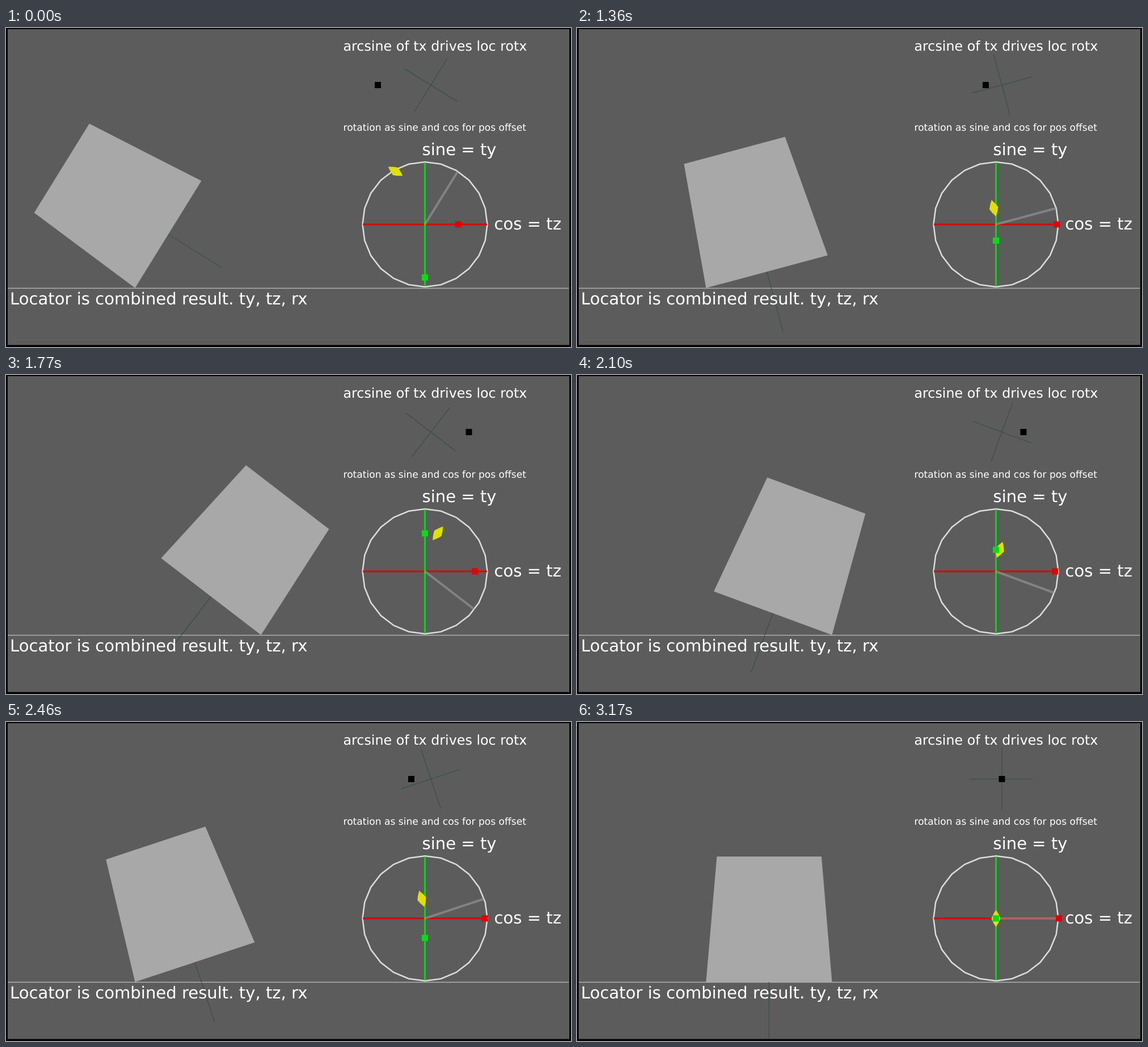
Write an HTML page that moves like this. It is 996 px wide and 562 px high and loops after 3860 ms.

```html
<!DOCTYPE html>
<html lang="en">
<head>
<meta charset="utf-8">
<title>Rolling box rig</title>
<style>
  html, body { margin: 0; width: 100%; height: 100%; overflow: hidden; background: #000; }
  svg { display: block; width: 996px; height: 562px; }
  text { font-family: "DejaVu Sans", Verdana, sans-serif; fill: #fff; text-rendering: geometricPrecision; }
  .big { font-size: 29.1px; }
  .locator { stroke: #2e4e43; stroke-width: 1; fill: none; }
</style>
</head>
<body>
<svg viewBox="0 0 996 562">
  <defs><clipPath id="view"><rect x="3" y="2" width="990" height="556.5"/></clipPath></defs>
  <g clip-path="url(#view)">
    <rect width="996" height="562" fill="#5c5c5c"/>
    <path d="M3 458.5H992" stroke="#b0b0b0" stroke-width="1.6"/>
    <g id="box">
      <path class="locator" d="M338.5 458V569"/>
      <path d="M227.5 458L246.5 237H431L449.5 458Z" fill="#a8a8a8"/>
    </g>

    <path id="cross" class="locator" d="M694 100.5H804M749 45.5V155.5"/>
    <rect id="driver" y="95" width="11" height="11" fill="#000"/>

    <polygon id="ring" fill="none" stroke="#dcdcdc" stroke-width="2.5"/>
    <path d="M629 346H848" stroke="#d60808" stroke-width="3"/>
    <path d="M738.5 237V455" stroke="#0cd414" stroke-width="3"/>
    <path id="hand" stroke="#a8a8a8" stroke-opacity=".5" stroke-width="4"/>
    <path id="leaf" d="M0-15Q5-8 8 0Q5 8 0 15Q-5 8-8 0Q-5-8 0-15Z" fill="#e0e000"/>
    <rect id="cos" y="340.5" width="11" height="11" fill="#e20000"/>
    <rect id="sin" x="733" width="11" height="11" fill="#00e010"/>

    <text x="594.5" y="40" font-size="23.8">arcsine of tx drives loc rotx</text>
    <text x="594.5" y="181.3" font-size="17.1">rotation as sine and cos for pos offset</text>
    <text class="big" x="733.5" y="224">sine = ty</text>
    <text class="big" x="860.5" y="354.5">cos = tz</text>
    <text class="big" x="7" y="487">Locator is combined result. ty, tz, rx</text>
  </g>
</svg>
<script>
const LOOP = 3860, R = 110, CX = 738.5, CY = 346;

// time in ms -> step number
const CLOCK = [[1140, 25], [1360, 30], [1770, 39], [2100, 46], [2460, 54], [3170, 70]];

// step number -> sideways offset of the driver
const SWING = [
  [24, -93.5], [25, -89.5], [27, -67], [30, -28.5], [33, 6], [36, 40], [39, 67],
  [42, 79], [44, 68], [46, 38], [48, 6], [50, -34], [52, -55], [54, -34.5],
  [56, 0], [59, 27], [63, 0], [66, -11], [70, 0]
];

const $ = id => document.getElementById(id);
const put = (id, attrs) => {
  for (const name in attrs) $(id).setAttribute(name, attrs[name]);
};

$("ring").setAttribute("points", Array.from({ length: 24 }, (_, i) => {
  const a = i * Math.PI / 12;
  return `${CX + R * Math.cos(a)},${CY + R * Math.sin(a)}`;
}).join(" "));

function stepAt(t) {
  if (t < CLOCK[0][0]) return 24;
  const i = CLOCK.findIndex(([end]) => t < end);
  if (i < 0) return 70;
  const [t0, n0] = CLOCK[i - 1], [t1, n1] = CLOCK[i];
  return Math.floor(n0 + (n1 - n0) * (t - t0) / (t1 - t0) + 1e-6);
}

function slope(i) {
  if (i === 0 || i === SWING.length - 1) return 0;
  const [x0, y0] = SWING[i - 1], [x1, y1] = SWING[i + 1];
  return (y1 - y0) / (x1 - x0);
}

function offsetAt(step) {
  const i = SWING.findIndex(([x]) => x >= step);
  if (SWING[i][0] === step) return SWING[i][1];
  const [x0, y0] = SWING[i - 1], [x1, y1] = SWING[i];
  const w = x1 - x0, u = (step - x0) / w, v = 1 - u;
  return y0 * (1 + 2 * u) * v * v + y1 * u * u * (3 - 2 * u)
    + w * u * v * (slope(i - 1) * v - slope(i) * u);
}

function draw(t) {
  const d = offsetAt(stepAt(t));
  const angle = Math.asin(d / R), deg = angle * 180 / Math.PI;
  const reach = R * Math.cos(angle);
  const drift = Math.sign(d) * (R - reach);
  const pivot = d > 0 ? 449.5 : 227.5;

  put("box", { transform: `rotate(${deg} ${pivot} 458)` });
  put("cross", { transform: `rotate(${deg} 749 100.5)` });
  put("driver", { x: 743.5 + d });
  put("hand", { d: `M${CX} ${CY}L${CX + reach} ${CY + d}` });
  put("leaf", { transform: `translate(${CX + drift} ${CY - Math.abs(d)}) rotate(${deg})` });
  put("cos", { x: CX + reach - 4.5 });
  put("sin", { y: CY - d - 5.5 });
}

const start = performance.now();
function tick() {
  draw((performance.now() - start) % LOOP);
  requestAnimationFrame(tick);
}
tick();
</script>
</body>
</html>
```
